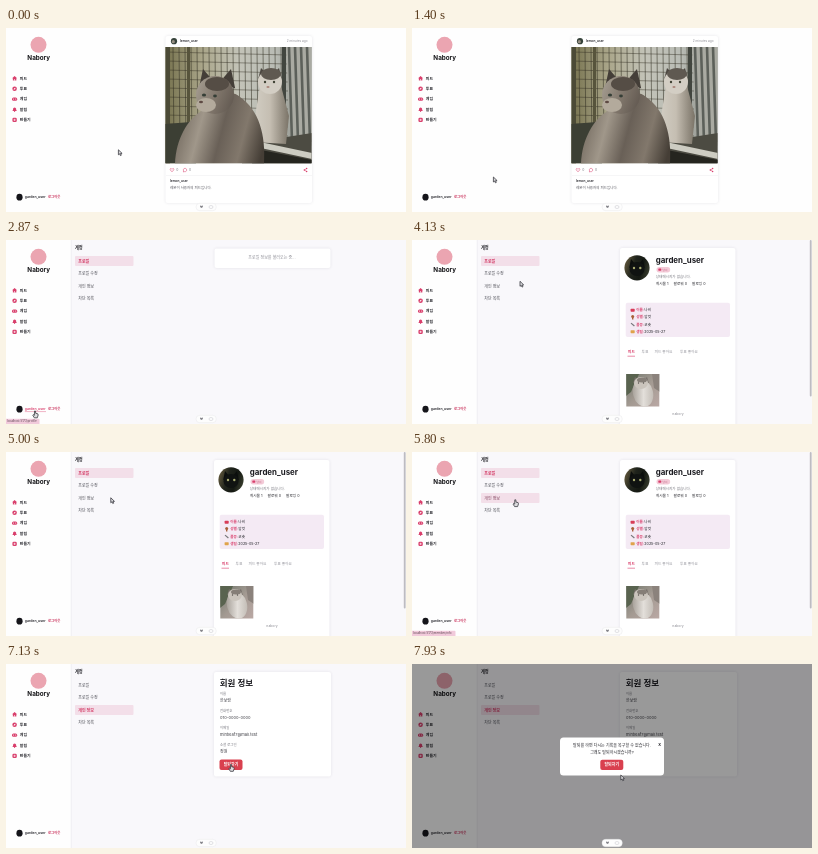
An HTML page with a canvas that plays this animation: 400 px wide and 184 px high, repeating every 8 s.

```html
<!DOCTYPE html>
<html lang="ko">
<head>
<meta charset="utf-8">
<title>Pet feed walkthrough</title>
<style>
html, body { margin: 0; width: 100%; height: 100%; overflow: hidden; background: #fefefe; }
canvas { display: block; width: 400px; height: 184px; }
</style>
</head>
<body>
<canvas id="stage"></canvas>
<script>
const W = 400, H = 184, LOOP = 8000;
const PINK = '#d93f6c', INK = '#25252b', GREY = '#8c8c94', TINT = '#f3dfe9', RED = '#d9404f';
const FONT = 'Inter, "Noto Sans CJK KR", "Noto Sans CJK", "Noto Sans", sans-serif';
const APP = 'Nabory', USER = 'garden_user', POSTER = 'lemon_user';

// Moments at which the screen changes
const T = { link: 2660, account: 2740, loaded: 3130, hover: 5290, info: 5870, infoLeft: 6200, modal: 7270 };

const canvas = document.getElementById('stage');
const c = canvas.getContext('2d');
const dpr = window.devicePixelRatio || 1;
canvas.width = W * dpr;
canvas.height = H * dpr;

function text(s, x, y, size, color = INK, weight = 400, align = 'left') {
  c.font = `${weight} ${size}px ${FONT}`;
  c.textAlign = align;
  c.textBaseline = 'middle';
  c.fillStyle = color;
  c.fillText(s, x, y);
}

function rect(x, y, w, h, color, r = 0) {
  c.fillStyle = color;
  c.beginPath();
  c.roundRect(x, y, w, h, r);
  c.fill();
}

function oval(x, y, rx, ry, color, turn = 0) {
  c.fillStyle = color;
  c.beginPath();
  c.ellipse(x, y, rx, ry, turn, 0, Math.PI * 2);
  c.fill();
}

const dot = (x, y, r, color) => oval(x, y, r, r, color);

function poly(points, color) {
  c.fillStyle = color;
  c.beginPath();
  points.forEach(([x, y]) => c.lineTo(x, y));
  c.closePath();
  c.fill();
}

function line(x1, y1, x2, y2, color, width = 0.5) {
  c.strokeStyle = color;
  c.lineWidth = width;
  c.beginPath();
  c.moveTo(x1, y1);
  c.lineTo(x2, y2);
  c.stroke();
}

function gradient(x1, y1, x2, y2, ...colors) {
  const g = c.createLinearGradient(x1, y1, x2, y2);
  colors.forEach((color, i) => g.addColorStop(i / (colors.length - 1), color));
  return g;
}

function clipRect(x, y, w, h) {
  c.save();
  c.beginPath();
  c.rect(x, y, w, h);
  c.clip();
}

function card(x, y, w, h, r = 2) {
  c.save();
  c.shadowColor = 'rgba(60,50,80,.12)';
  c.shadowBlur = 3 * dpr;
  rect(x, y, w, h, '#fff', r);
  c.restore();
}

function heart(x, y, s, color, filled) {
  c.beginPath();
  c.moveTo(x, y + s);
  c.bezierCurveTo(x - s * 2, y - s * 0.3, x - s * 0.8, y - s * 1.6, x, y - s * 0.45);
  c.bezierCurveTo(x + s * 0.8, y - s * 1.6, x + s * 2, y - s * 0.3, x, y + s);
  c.fillStyle = c.strokeStyle = color;
  c.lineWidth = 0.5;
  filled ? c.fill() : c.stroke();
}

// Menu icons, drawn around the origin
const icons = [
  () => {
    poly([[-2.9, 0], [0, -2.7], [2.9, 0]], PINK);
    rect(-2, -0.4, 4, 2.9, PINK);
    rect(-0.5, 1, 1, 1.5, '#fff');
  },
  () => {
    dot(0, 0, 2.6, PINK);
    poly([[-1.2, 1.2], [-0.5, -0.5], [1.2, -1.2], [0.5, 0.5]], '#fff');
  },
  () => {
    rect(-3, -1.8, 6, 3.8, PINK, 1.8);
    dot(-1.3, 0, 0.6, '#fff');
    dot(1.3, 0, 0.6, '#fff');
  },
  () => {
    rect(-1.8, -2.4, 3.6, 4, PINK, [1.8, 1.8, 0, 0]);
    rect(-2.5, 0.9, 5, 0.9, PINK, 0.4);
    dot(0, 2.1, 0.7, PINK);
  },
  () => {
    rect(-2.5, -2.5, 5, 5, PINK, 1.6);
    line(0, -1.3, 0, 1.3, '#fff', 0.7);
    line(-1.3, 0, 1.3, 0, '#fff', 0.7);
  }
];

function sidebar(hovered) {
  dot(32.5, 16.8, 8, '#eba5b1');
  text(APP, 32.7, 30.6, 6.3, '#151518', 700, 'center');
  ['피드', '투표', '게임', '알림', '만들기'].forEach((name, i) => {
    const y = 50.3 + i * 10.4;
    c.save();
    c.translate(8.6, y);
    c.scale(0.87, 0.87);
    icons[i]();
    c.restore();
    text(name, 13.8, y + 0.2, 3.9, INK, 600);
  });
  oval(13.5, 169.2, 3.1, 3.4, '#15151a');
  text(USER, 18.8, 169.2, 3.45, hovered ? PINK : INK, 600);
  if (hovered) line(18.8, 171.6, 40, 171.6, PINK, 0.4);
  text('로그아웃', 42, 169.4, 3.4, '#cb365f', 600);
}

function ears(x, y, gap, h, color) {
  for (const side of [-1, 1]) {
    poly([[x + side * gap * 0.2, y], [x + side * gap, y - h], [x + side * gap * 1.3, y + h * 0.5]], color);
  }
}

function feedPhoto() {
  clipRect(159.5, 19, 146, 116.3);
  rect(159, 19, 147, 117, gradient(160, 0, 306, 0, '#77734f', '#aaa68a', '#c3c3b8', '#b9bcb5', '#777b74'));
  for (let x = 161; x < 280; x += 6) line(x, 19, x + 1, 120, 'rgba(48,45,32,.6)', 0.9);
  for (let y = 24; y < 116; y += 9) line(160, y, 282, y + 3, 'rgba(48,45,32,.55)', 0.8);
  rect(159, 19, 5, 117, '#4b4a36');
  rect(181, 19, 3, 90, '#57543c');
  poly([[280, 19], [306, 19], [306, 118], [284, 106]], '#a9aaa2');
  for (let x = 283; x < 306; x += 6) line(x, 19, x + 3, 114, '#5c605a', 2.6);
  rect(276, 19, 4, 95, '#42463f');
  poly([[159, 96], [185, 94], [190, 136], [159, 136]], '#3c3f34');
  poly([[236, 116], [306, 105], [306, 136], [236, 136]], '#4c4b42');
  poly([[240, 111], [306, 125], [306, 131], [250, 119]], '#cdccc2');
  poly([[250, 121], [306, 132], [306, 136], [246, 136]], '#25251f');

  const white = gradient(246, 0, 282, 0, '#d3cfc5', '#c5beb2', '#7e776b');
  poly([[254, 58], [275, 58], [283, 88], [280, 116], [248, 114], [250, 82]], white);
  ears(264, 47, 9, 7, '#4c4741');
  oval(264, 54, 12, 12, '#d3cec4');
  oval(265, 46, 10, 6, '#5f5951');
  dot(259, 54, 1.2, '#3f4234');
  dot(268, 54, 1.2, '#3f4234');
  oval(262, 59, 1.6, 1, '#a9877c');

  const fur = gradient(172, 95, 258, 118, '#766d62', '#a0978a', '#696057', '#82786c', '#453e36');
  c.fillStyle = fur;
  c.beginPath();
  c.moveTo(169, 136);
  c.bezierCurveTo(170, 110, 182, 92, 194, 84);
  c.bezierCurveTo(204, 74, 222, 58, 234, 69);
  c.bezierCurveTo(253, 82, 260, 107, 258, 136);
  c.fill();
  ears(211, 54, 14, 13, '#443e38');
  oval(209, 67, 19, 19, gradient(190, 60, 229, 75, '#a29a8e', '#81776c', '#615850'));
  oval(200, 77, 10, 7, '#b3aa9c');
  oval(211, 56, 12, 7, '#554d45');
  oval(198, 67, 2.1, 1.6, '#353e36');
  oval(209, 68, 1.9, 1.4, '#353e36');
  oval(195, 74, 2, 1.3, '#5e4a43');
  c.restore();
}

function feed() {
  rect(0, 0, W, H, '#fefefe');
  sidebar(false);
  card(159.5, 8, 146.5, 167);
  dot(168, 13.2, 3.1, '#37433b');
  dot(167.3, 13.7, 1.6, '#968f83');
  text(POSTER, 174, 13.2, 3.2, INK, 600);
  text('2 minutes ago', 301.5, 13.2, 3.1, GREY, 400, 'right');
  feedPhoto();
  heart(166, 142, 1.7, PINK);
  text('0', 170.3, 142.2, 3.4, '#77777f');
  c.strokeStyle = PINK;
  c.beginPath();
  c.arc(179, 142, 1.7, 2.4, 8.1);
  c.lineTo(177.1, 143.9);
  c.closePath();
  c.stroke();
  text('0', 183, 142.2, 3.4, '#77777f');
  const share = [[298.3, 142], [300.6, 140.6], [300.6, 143.4]];
  share.forEach(([x, y]) => {
    line(298.3, 142, x, y, PINK, 0.6);
    dot(x, y, 0.75, PINK);
  });
  line(160, 147.5, 306, 147.5, '#ececef', 0.5);
  text(POSTER, 164, 152.6, 3.2, INK, 600);
  text('레몬이 사용자의 피드입니다.', 164, 160, 3.5, '#56565e');
}

function accountShell(active, hovered, userHover) {
  rect(0, 0, W, H, '#f9f8fb');
  rect(0, 0, 65, H, '#fefefe');
  line(65.2, 0, 65.2, H, '#e9e8ec', 0.6);
  sidebar(userHover);
  text('계정', 69, 8.2, 4.2, INK, 600);
  ['프로필', '프로필 수정', '개인 정보', '차단 목록'].forEach((name, i) => {
    const y = 21 + i * 12.5, on = i === active, over = i === hovered;
    if (on || over) rect(69, y - 5.1, 58.5, 10.2, TINT, 1);
    text(name, 72.2, y + 0.4, 4, on ? '#d2335f' : over ? '#7d3d58' : '#4b4b53', on ? 700 : 400);
  });
}

function loading() {
  card(208.5, 8.5, 116, 19.5);
  text('프로필 정보를 불러오는 중...', 266, 18.2, 4, '#8f8f97', 400, 'center');
}

function profile() {
  card(208, 8, 115.5, 190);
  rect(397.8, 0, 1.8, 156.5, '#bdbcc1', 0.9);
  dot(225, 27.8, 12.6, gradient(213, 24, 238, 32, '#5a5238', '#20241c', '#141812', '#3b4030'));
  ears(225, 25, 6, 6, '#0c0f0d');
  oval(225, 29, 7.5, 7, '#101311');
  dot(222, 28, 1.2, '#a9ad70');
  dot(228.3, 28, 1.2, '#a9ad70');
  text(USER, 243.8, 20.3, 7.9, '#1b1b20', 700);
  rect(244.5, 27, 13.7, 5.4, '#f3cbd8', 2.7);
  rect(246.3, 28.6, 3, 2.1, PINK, 0.6);
  text('냥이', 250.5, 29.8, 2.7, '#c26683');
  text('상태메시지가 없습니다.', 243.8, 37, 3.6, '#77777f');
  text('게시물 1', 243.8, 44.2, 3.7);
  text('팔로워 0', 261.5, 44.2, 3.7);
  text('팔로잉 0', 280, 44.2, 3.7);

  rect(213.7, 62.8, 104.3, 34.2, '#f4eaf4', 2);
  [['이름:', '나비', '#d83c58'], ['성별:', '암컷', '#a85f38'], ['품종:', '코숏', '#77777b'], ['생일:', '2025-05-27', '#dfa34b']]
    .forEach(([label, value, color], i) => {
      const y = 70.2 + i * 7.15;
      if (i === 1) { dot(220.7, y - 0.8, 1.5, color); rect(220, y, 1.4, 2.2, color); }
      else if (i === 2) line(219, y - 1.4, 222.4, y + 1.5, color, 1.2);
      else rect(218.6, y - 1.5, 4.1, 3, color, 0.7);
      text(label, 224.2, y, 3.6, PINK, 600);
      text(value, 232.3, y, 3.7);
    });

  [['피드', 216], ['투표', 229.5], ['피드 좋아요', 242.5], ['투표 좋아요', 268]].forEach(([name, x], i) =>
    text(name, x, 111.4, 3.7, i ? '#96969e' : PINK, i ? 400 : 600));
  line(215.5, 116.2, 223, 116.2, PINK, 0.6);
  thumbnail();
  text(APP.toLowerCase(), 266, 174.3, 3.4, GREY, 400, 'center');
}

function thumbnail() {
  clipRect(214.3, 134, 33, 32.5);
  rect(214, 134, 34, 33, gradient(214, 134, 248, 167, '#6f756a', '#a39a92', '#bba9a5'));
  poly([[214, 134], [227, 134], [219, 152], [214, 156]], '#59634f');
  poly([[240, 134], [248, 134], [248, 152], [242, 148]], '#8b827c');
  oval(231, 153, 10, 14, gradient(221, 0, 242, 0, '#aaa49d', '#e3dfda', '#c1bbb4'), -0.25);
  ears(229, 141, 6, 4, '#77706a');
  oval(229, 143, 7, 6, '#cac4bc');
  oval(230, 140, 5, 2.5, '#857e77');
  dot(226.5, 143, 0.7, '#504d49');
  dot(231.5, 143, 0.7, '#504d49');
  c.restore();
}

function redButton(x, y) {
  rect(x, y, 23, 10.4, RED, 2);
  text('탈퇴하기', x + 11.5, y + 5.4, 4, '#fff', 600, 'center');
}

function memberInfo() {
  card(208, 8, 117, 104.5);
  text('회원 정보', 213.8, 19.5, 8.5, '#1d1d22', 700);
  [['이름', '한보람'], ['전화번호', '010-0000-0000'], ['이메일', 'mintleaf7@mail.test'], ['소셜 로그인', '정원']]
    .forEach(([label, value], i) => {
      const y = 30.4 + i * 17;
      text(label, 214, y, 3.4, '#77777f');
      text(value, 214, y + 6.6, 4, '#3b3b42');
    });
  redButton(213.5, 95.5);
}

function modal() {
  rect(0, 0, W, H, 'rgba(0,0,0,.4)');
  rect(148, 73.5, 104, 38, '#fff', 3.5);
  text('탈퇴를 하면 다시는 기록을 복구할 수 없습니다.', 200, 82.2, 4, INK, 400, 'center');
  text('그래도 탈퇴하시겠습니까?', 200, 88.7, 4, INK, 400, 'center');
  text('x', 247.5, 80.7, 4.8, INK, 600, 'center');
  redButton(188.3, 95.7);
}

function pill() {
  rect(190, 175.3, 20.3, 7.4, '#fdfdfd', 3.7);
  c.strokeStyle = '#e3e3e6';
  c.lineWidth = 0.4;
  c.stroke();
  heart(195.5, 178.7, 1.4, '#85858b', true);
  c.strokeStyle = '#c5c5ca';
  c.lineWidth = 0.5;
  c.beginPath();
  c.ellipse(205, 179, 2, 1.5, 0, 0, 7);
  c.stroke();
}

function status(url, w) {
  rect(0, 178.7, w, 5.3, '#f1cadb', [0, 1, 0, 0]);
  text(url, 1, 181.5, 2.95, '#5d4451');
}

// Pointer stops: time, x, y
const path = [
  [0, 112.4, 121.8], [250, 112.4, 121.8], [1150, 81.4, 149], [1750, 81.4, 149],
  [2580, 29, 171], [3180, 29, 171], [3950, 108, 41.3], [4500, 108, 41.3],
  [5300, 103.3, 47.8], [5810, 103.3, 47.8], [5930, 118, 48.6], [6120, 120, 50],
  [6850, 225, 100.5], [7380, 225, 100.5], [7930, 208.8, 111], [8000, 207, 109.5]
];

function pointerAt(t) {
  const i = path.findIndex(p => p[0] > t);
  const [t0, x0, y0] = path[i - 1], [t1, x1, y1] = path[i];
  const u = (t - t0) / (t1 - t0), e = u * u * (3 - 2 * u);
  return [x0 + (x1 - x0) * e, y0 + (y1 - y0) * e];
}

function pointer(x, y, hand) {
  c.save();
  c.translate(x, y);
  c.beginPath();
  const shape = hand
    ? [[-0.5, 0], [0.5, 0], [0.7, 2.3], [2.8, 2.8], [3.2, 4], [2.3, 6.8], [-0.7, 6.8], [-2.2, 4.3], [-1.7, 3.6], [-0.6, 4.3]]
    : [[0, 0], [0, 5], [1.2, 4], [2, 5.8], [2.9, 5.4], [2.1, 3.7], [3.7, 3.6]];
  shape.forEach(p => c.lineTo(...p));
  c.closePath();
  c.lineJoin = 'round';
  c.fillStyle = '#dcdcdf';
  c.strokeStyle = '#3c3c42';
  c.lineWidth = 0.8;
  c.fill();
  c.stroke();
  c.restore();
}

function draw(t) {
  const [x, y] = pointerAt(t);
  const onUser = t >= T.link && x < 40 && y > 165;
  const onItem = t >= T.hover && t < T.info;
  const onButton = t > 6700 && t < T.modal && x > 213 && x < 237 && y > 95;
  c.setTransform(dpr, 0, 0, dpr, 0, 0);
  if (t < T.account) feed();
  else {
    accountShell(t < T.info ? 0 : 2, onItem ? 2 : -1, onUser);
    if (t < T.loaded) loading();
    else if (t < T.info) profile();
    else memberInfo();
  }
  if (onUser) status('localhost:5173/profile', 33.5);
  if (t >= T.hover && t < T.infoLeft) status('localhost:5173/member/info', 43.5);
  if (t >= T.modal) modal();
  pill();
  pointer(x, y, onUser || onItem || onButton);
}

const start = performance.now();
function tick() {
  draw((performance.now() - start) % LOOP);
  requestAnimationFrame(tick);
}
tick();
</script>
</body>
</html>
```
